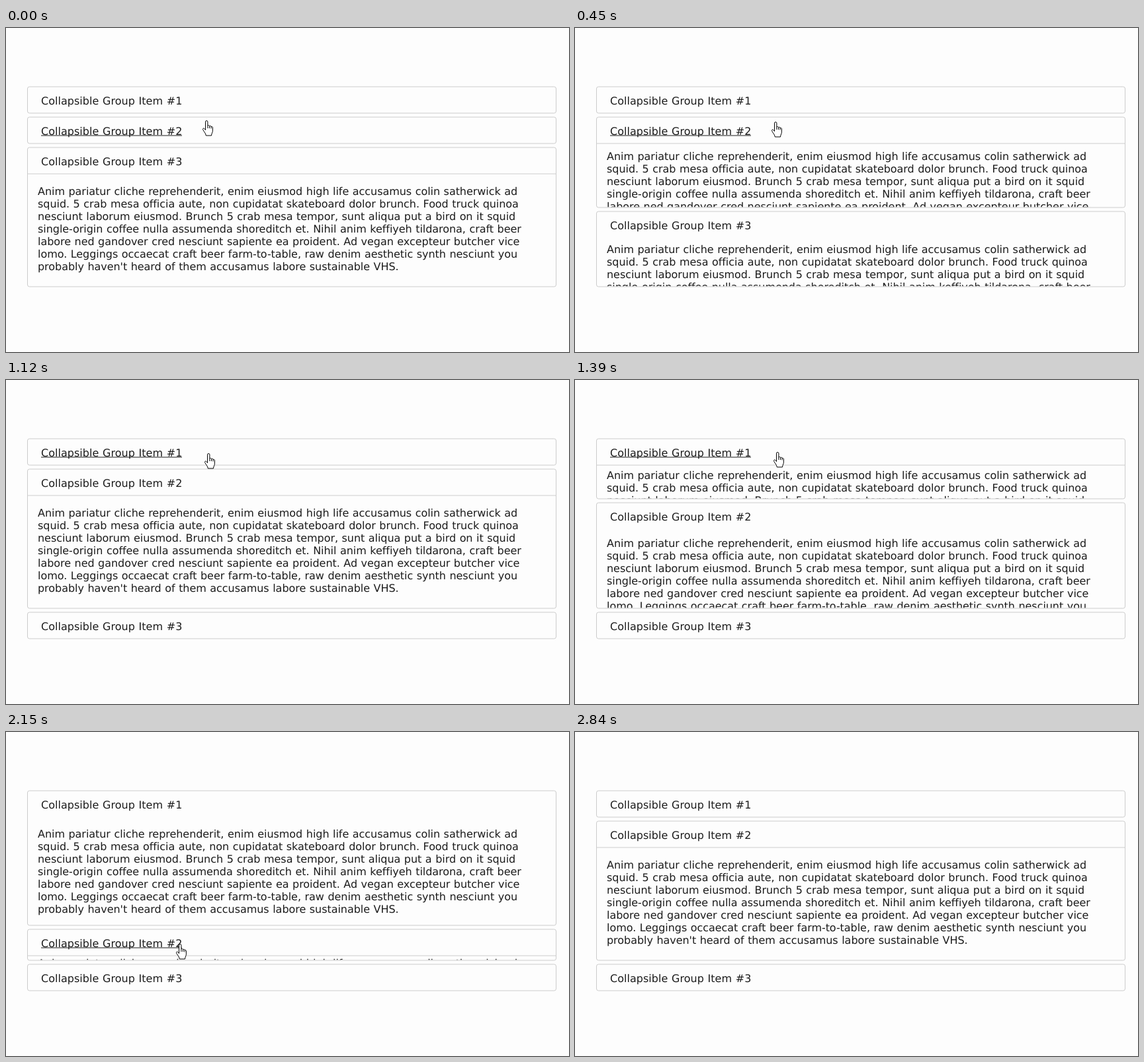
Write an HTML page that moves like this. It is 851 by 491 pixels and loops after 3490 ms.

```html
<!DOCTYPE html>
<html lang="en">
<head>
<meta charset="utf-8">
<title>Accordion</title>
<style>
  html, body { margin: 0; width: 100%; height: 100%; overflow: hidden; background: #fdfdfd; }
  svg { display: block; }
  text {
    font: 16px "DejaVu Sans", Verdana, sans-serif;
    word-spacing: .54px;
    text-rendering: geometricPrecision;
    white-space: pre;
  }
  text, .underline { fill: #1c1c1c; }
  .title { letter-spacing: .03px; }
  .copy { letter-spacing: -.05px; }
  .edge { fill: none; stroke: #ccc; }
  .cursor { fill: #fff; stroke: #000; stroke-linejoin: round; }
</style>
</head>
<body>
<svg id="stage" width="851" height="491" viewBox="0 0 851 491">
  <defs>
    <path id="hand" d="M5.5 14.5V2.2a1.7 1.7 0 0 1 3.4 0V8c.8-.9 2.4-.6 2.7.6.9-.7 2.2-.3 2.5.8 1-.4 2.3.2 2.3 1.5v5c0 2.2-1.7 3.8-1.9 7.1H6.3c-.2-2.8-2.5-5.3-4.4-8.4-1.2-2 .6-3.5 2.1-1.9zM8.9 8v4M11.6 8.6v3.4M14.1 9.4v3"/>
    <path id="arrow" d="M.5.7v15.6l3.6-3.4 2.5 5.6 2.2-1-2.5-5.4h5z"/>
    <path id="beam" fill="none" d="M.5.5h2l1 1 1-1h2M3.5 1.5v13M.5 15.5h2l1-1 1 1h2M2 10.5h3"/>
  </defs>
</svg>
<script>
const LOOP = 3490, TOP = 89, HEAD = 40, GAP = 6, BODY = 171;
const SLIDE = 455, FIRST_OPEN = 2;
const COPY = [
  'Anim pariatur cliche reprehenderit, enim eiusmod high life accusamus colin satherwick ad',
  'squid. 5 crab mesa officia aute, non cupidatat skateboard dolor brunch. Food truck quinoa',
  'nesciunt laborum eiusmod. Brunch 5 crab mesa tempor, sunt aliqua put a bird on it squid',
  'single-origin coffee nulla assumenda shoreditch et. Nihil anim keffiyeh tildarona, craft beer',
  'labore ned gandover cred nesciunt sapiente ea proident. Ad vegan excepteur butcher vice',
  'lomo. Leggings occaecat craft beer farm-to-table, raw denim aesthetic synth nesciunt you',
  "probably haven't heard of them accusamus labore sustainable VHS."
];

// Click time and the panel it opens
const clicks = [[203, 1], [1223, 0], [2090, 1]];

// Repaint times
const ticks = [0, 150, 300, 450, 570, 720, 970, 1120, 1270, 1390, 1550, 1700,
  1850, 2000, 2150, 2270, 2420, 2570, 2690, 2840];

// Time, hovered panel, cursor, x, y
const pointer = [
  [0, 1, 'hand', 296, 140],
  [150, 1, 'hand', 296, 142],
  [970, 0, 'hand', 296, 123],
  [1120, 0, 'hand', 299, 111],
  [1270, 0, 'hand', 299, 109],
  [1550, 0, 'hand', 296, 117],
  [1700, -1, 'beam', 273, 211],
  [1850, -1, 'arrow', 262, 304],
  [2000, 1, 'hand', 256, 321],
  [2420, 2, 'arrow', 472, 394],
  [2570, -1, 'arrow', 640, 452],
  [2690, -1, 'arrow', 765, 487],
  [2840, -1, 'arrow', 765, 500]
];

const stage = document.getElementById('stage');

function add(parent, tag, attrs, text = '') {
  const el = document.createElementNS('http://www.w3.org/2000/svg', tag);
  set(el, attrs);
  el.textContent = text;
  return parent.appendChild(el);
}

function set(el, attrs) {
  for (const key in attrs) el.setAttribute(key, attrs[key]);
}

function makePanel(i) {
  const group = add(stage, 'g', {});
  const clip = add(group, 'clipPath', { id: 'clip' + i });
  const mask = add(clip, 'rect', { x: 33, y: HEAD + .5, width: 798 });
  const body = add(group, 'g', { 'clip-path': `url(#clip${i})` });
  const copy = add(body, 'text', { class: 'copy' });
  COPY.forEach((line, n) => add(copy, 'tspan', { x: 48, y: n * 19 }, line));
  add(group, 'text', { class: 'title', x: 53, y: 27 }, 'Collapsible Group Item #' + (i + 1));
  const underline = add(group, 'rect', { class: 'underline', x: 53, y: 27.5, width: 213, height: 1 });
  const rule = add(group, 'path', { class: 'edge', d: `M33 ${HEAD}H831` });
  const frame = add(group, 'rect', { class: 'edge', x: 32.5, width: 799, rx: 3 });
  return { group, mask, body, copy, underline, rule, frame };
}

const panels = [0, 1, 2].map(makePanel);
const cursor = add(stage, 'use', { class: 'cursor' });

const show = (el, on) => { el.style.display = on ? '' : 'none'; };

function bodyHeights(t) {
  const heights = [0, 0, 0];
  let from = FIRST_OPEN, open = FIRST_OPEN, start = -SLIDE;
  for (const [time, panel] of clicks) {
    if (time <= t) [from, open, start] = [open, panel, time];
  }
  const p = Math.min(1, (t - start) / SLIDE);
  const h = Math.round(BODY * (.5 - Math.cos(Math.PI * p) / 2));
  heights[from] = BODY - h;
  heights[open] = h;
  return { heights, open };
}

function draw(t) {
  const { heights, open } = bodyHeights(t);
  const [, hover, shape, cx, cy] = pointer.findLast(([time]) => time <= t);
  let y = TOP;
  panels.forEach((p, i) => {
    const h = heights[i];
    // Padding grows together with the height
    const base = HEAD + Math.floor(17 + 15 * h / BODY);
    set(p.group, { transform: `translate(0 ${y})` });
    set(p.frame, { height: HEAD + h });
    set(p.mask, { height: Math.max(0, h - 1) });
    set(p.copy, { transform: `translate(0 ${base})` });
    show(p.body, h > 1);
    show(p.rule, i === open);
    show(p.underline, i === hover);
    y += HEAD + h + GAP;
  });
  set(cursor, { href: '#' + shape, x: cx, y: cy });
}

const origin = performance.now();
let last = -1;

function frame() {
  const t = (performance.now() - origin) % LOOP;
  const tick = ticks.findLast(time => time <= t);
  if (tick !== last) draw(last = tick);
  requestAnimationFrame(frame);
}
frame();
</script>
</body>
</html>
```
